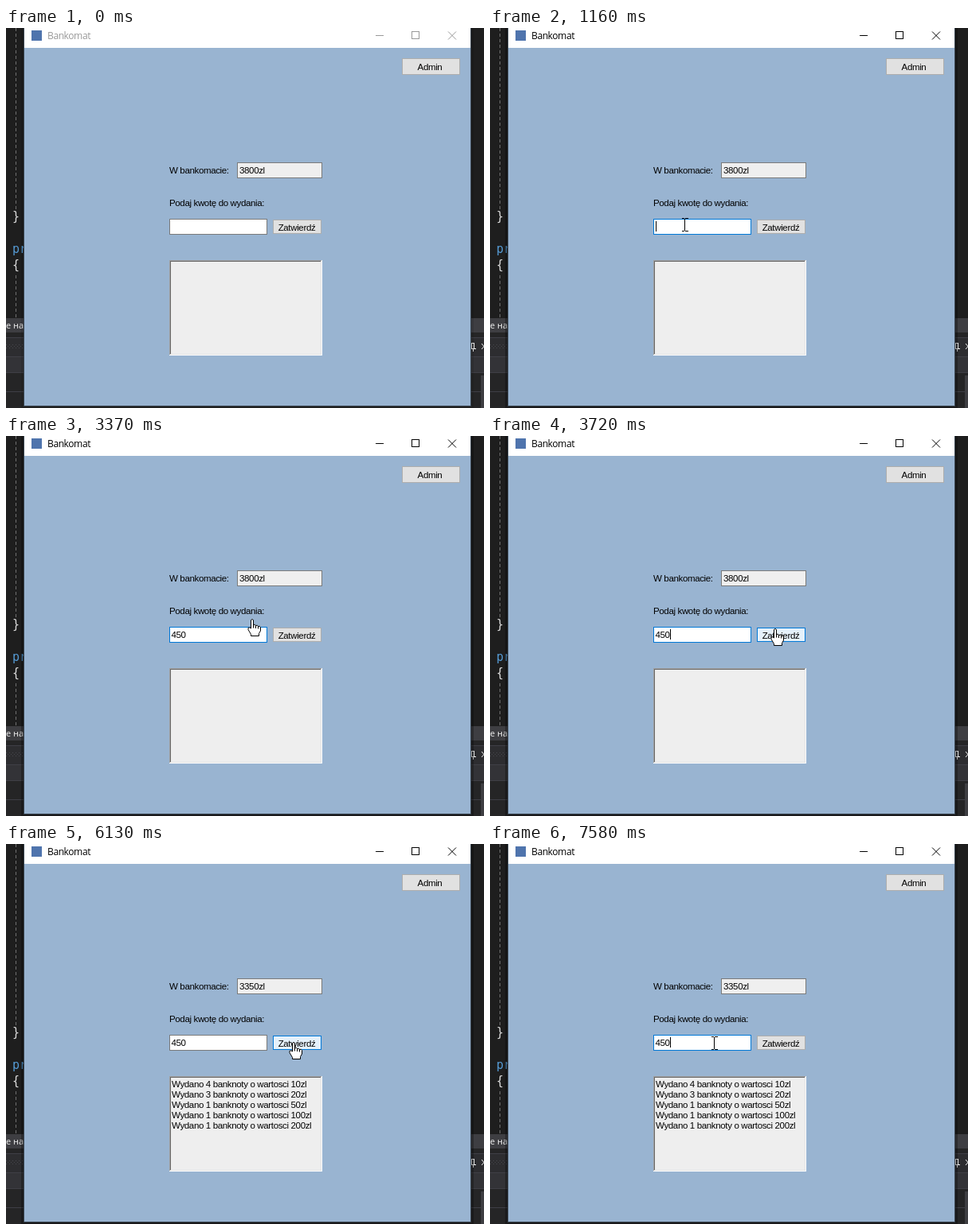
Animation of 600 by 478 pixels, one loop 8 s. Source, as an HTML page:

```html
<!DOCTYPE html>
<html lang="pl">
<head>
<meta charset="utf-8">
<title>Bankomat</title>
<style>
  html, body { margin: 0; width: 100%; height: 100%; overflow: hidden; background: #1e1e1e; }
  svg { display: block; width: 600px; height: 478px; }
  rect, .crisp { shape-rendering: crispEdges; }
  text { white-space: pre; }
  .ui { font: 11.5px "Liberation Sans", Arial, sans-serif; letter-spacing: -.35px; }
  .title { font: 12px "Open Sans", "Noto Sans", sans-serif; letter-spacing: -.4px; }
  .code { font: 15px "DejaVu Sans Mono", monospace; }
  .status { font: 11px "Open Sans", "Noto Sans", sans-serif; }
</style>
</head>
<body>
<svg id="stage" viewBox="0 0 600 478" xmlns="http://www.w3.org/2000/svg"></svg>
<script>
const stage = document.getElementById("stage");
const LOOP = 8000, STEP = 70, BLINK = 530;

function add(tag, attrs, text, parent = stage) {
  const el = document.createElementNS("http://www.w3.org/2000/svg", tag);
  for (const key in attrs) el.setAttribute(key, attrs[key]);
  if (text) el.textContent = text;
  parent.append(el);
  return el;
}
const fillRect = (x, y, width, height, fill) => add("rect", { x, y, width, height, fill });
const frame = (x, y, w, h, fill, stroke) =>
  add("rect", { x: x + .5, y: y + .5, width: w - 1, height: h - 1, fill, stroke });
const line = (d, stroke, extra) => add("path", { d, stroke, fill: "none", class: "crisp", ...extra });
const label = (x, y, text, cls = "ui", fill = "#000", extra) =>
  add("text", { x, y, class: cls, fill, ...extra }, text);
const show = (el, on) => el.setAttribute("visibility", on ? "visible" : "hidden");
const paint = (el, name, value) => el.setAttribute(name, value);

// Editor behind the window
fillRect(0, 0, 600, 478, "#1e1e1e");
line("M12.5 0V228M12.5 311V365", "#707070", { "stroke-dasharray": "4 3" });
label(8, 242, "}", "code", "#dcdcdc");
label(8, 283, "pr", "code", "#569cd6");
label(8, 303, "{", "code", "#dcdcdc");
fillRect(0, 365, 600, 18, "#3e3e42");
label(0, 378, "е на", "status", "#f1f1f1");
fillRect(0, 383, 600, 95, "#252526");
fillRect(0, 389, 600, 24, "#2d2d30");
line("M0 398.5H23M0 402.5H23", "#47474c", { "stroke-dasharray": "1 3" });
line("M2 400.5H23", "#47474c", { "stroke-dasharray": "1 3" });
fillRect(0, 413, 600, 21, "#333337");
line("M0 389.5H600M0 413.5H600M0 433.5H600M0 457.5H600", "#3f3f46");
line("M584.5 396V403M587.5 396V403M584 396.5H588M583 403.5H590M586.5 403V407", "#f1f1f1");
line("M597 397L603 404M603 397L597 404", "#f1f1f1", { class: "" });
fillRect(596, 437, 4, 41, "#3e3e42");

// Window
const shadow = add("rect", { x: 19, y: -5, width: 568, height: 483, fill: "#000" });
fillRect(22, 0, 562, 476, "#3a4550");
fillRect(23, 0, 560, 475, "#99b4d1");
fillRect(23, 0, 560, 25, "#fff");
fillRect(32, 3, 13, 13, "#4f74ad");
const title = label(52, 14, "Bankomat", "title");
const winButtons = [
  line("M464 9.5H474M509.5 4.5H518.5V13.5H509.5Z", "#000"),
  line("M555 4.5L565 14.5M565 4.5L555 14.5", "#000", { class: "" })
];

// Form
frame(497, 38, 73, 21, "#e1e1e1", "#adadad");
label(532, 53, "Admin", "ui", "#000", { "text-anchor": "middle" });
label(205, 183, "W bankomacie:");
frame(290, 169, 107, 20, "#efefef", "#7a7a7a");
const balance = label(293, 183, "");
label(205, 224, "Podaj kwotę do wydania:");
const input = frame(205, 240, 123, 20, "#fff", "#7a7a7a");
const amount = label(207.5, 254, "");
const caret = fillRect(208, 243, 1, 13, "#000");
const button = frame(335, 241, 61, 18, "#e1e1e1", "#adadad");
label(365, 255, "Zatwierdź", "ui", "#000", { "text-anchor": "middle" });

fillRect(205, 292, 192, 120, "#fff");
fillRect(205, 292, 191, 119, "#a0a0a0");
fillRect(206, 293, 190, 118, "#e3e3e3");
fillRect(206, 293, 189, 117, "#696969");
fillRect(207, 294, 188, 116, "#eeeeee");
const payout = [[4, 10], [3, 20], [1, 50], [1, 100], [1, 200]].map(([count, value], i) =>
  label(208, 306 + 13 * i, `Wydano ${count} banknoty o wartosci ${value}zl`));

// Pointers, drawn around their hot spot
const hand = add("g", { stroke: "#000", fill: "#fff", "stroke-linejoin": "round" });
add("path", { d: "M-1.5 12V1.5Q0-.5 1.5 1.5V7.5Q3.7 6.3 4.5 8.5Q6.7 7.3 7.5 9.5Q9.7 8.6 10.5 10.5V15L8.5 18.5V21.5H-1.5V19.5L-5 13.5Q-5.5 10.2-3.2 10.8Z" }, "", hand);
add("path", { d: "M1.5 7V11.5M4.5 8V12M7.5 9V12.5", fill: "none" }, "", hand);
const beam = line("M-3.5-7.5H-1L.5-6.5 2-7.5H4.5M-3.5 8.5H-1L.5 7.5 2 8.5H4.5M.5-7V8", "#000");

// Time, x, y of the pointer
const path = [
  [330, 540, 471], [400, 455, 422], [470, 385, 376], [540, 330, 338], [610, 293, 311],
  [670, 268, 290], [740, 251, 266], [880, 246, 255], [1090, 244, 247], [2220, 244, 247],
  [3230, 255, 246], [3300, 281, 236], [3370, 309, 230], [3510, 345, 232], [3650, 357, 237],
  [3790, 359, 247], [3930, 359, 247], [6130, 361, 249], [6200, 360, 257], [6340, 350, 273],
  [6480, 338, 265], [6680, 322, 257], [6890, 288, 252], [7090, 286, 249], [7300, 283, 245],
  [7580, 281, 250]
];
// Spans in which the pointer is refreshed; it rests in between
const moves = [[330, 1090], [3230, 3930], [6130, 6480], [6680, 6890], [7090, 7580]];
const keyTimes = [2290, 2430, 2500];
const caretResets = [1160, ...keyTimes, 7510];

function pointerAt(t) {
  const [start, end] = moves.filter(m => m[0] <= t).pop() || moves[0];
  const q = Math.min(end, start + Math.floor(Math.max(0, t - start) / STEP) * STEP);
  const i = Math.max(1, path.findIndex(p => p[0] >= q));
  const [a, b] = [path[i - 1], path[i]];
  const k = (q - a[0]) / (b[0] - a[0]);
  return { x: Math.round(a[1] + (b[1] - a[1]) * k), y: Math.round(a[2] + (b[2] - a[2]) * k) };
}
const inside = (p, x, y, w, h) => p.x >= x && p.x < x + w && p.y >= y && p.y < y + h;

function render(t) {
  const active = t >= 1160;
  const inputFocus = active && t < 3790 || t >= 7510;
  const buttonFocus = t >= 3790 && t < 7510;
  const paid = t >= 3930;

  paint(shadow, "opacity", active ? .3 : .12);
  paint(title, "fill", active ? "#000" : "#999");
  winButtons.forEach(el => paint(el, "stroke", active ? "#000" : "#999"));

  const visible = t >= 330 && (t < 2290 || t >= 3230);
  const pos = pointerAt(t);
  const overInput = visible && inside(pos, 205, 240, 123, 20);
  const overButton = visible && inside(pos, 335, 241, 61, 18);
  const pressed = t >= 3790 && t < 3930;
  show(hand, visible && !overInput);
  show(beam, overInput);
  for (const el of [hand, beam]) paint(el, "transform", `translate(${pos.x} ${pos.y})`);

  paint(input, "stroke", inputFocus ? "#0078d7" : overInput ? "#171717" : "#7a7a7a");
  paint(button, "stroke", buttonFocus || overButton ? "#0078d7" : "#adadad");
  paint(button, "fill", pressed ? "#cce4f7" : overButton ? "#e5f1fb" : "#e1e1e1");

  const typed = "450".slice(0, keyTimes.filter(k => k <= t).length);
  amount.textContent = typed;
  const reset = caretResets.filter(r => r <= t).pop();
  show(caret, inputFocus && Math.floor((t - reset) / BLINK) % 2 === 0);
  paint(caret, "x", 208 + 6 * typed.length);

  balance.textContent = paid ? "3350zl" : "3800zl";
  payout.forEach(el => show(el, paid));
}

const begin = performance.now();
function tick() {
  render((performance.now() - begin) % LOOP);
  requestAnimationFrame(tick);
}
tick();
</script>
</body>
</html>
```
